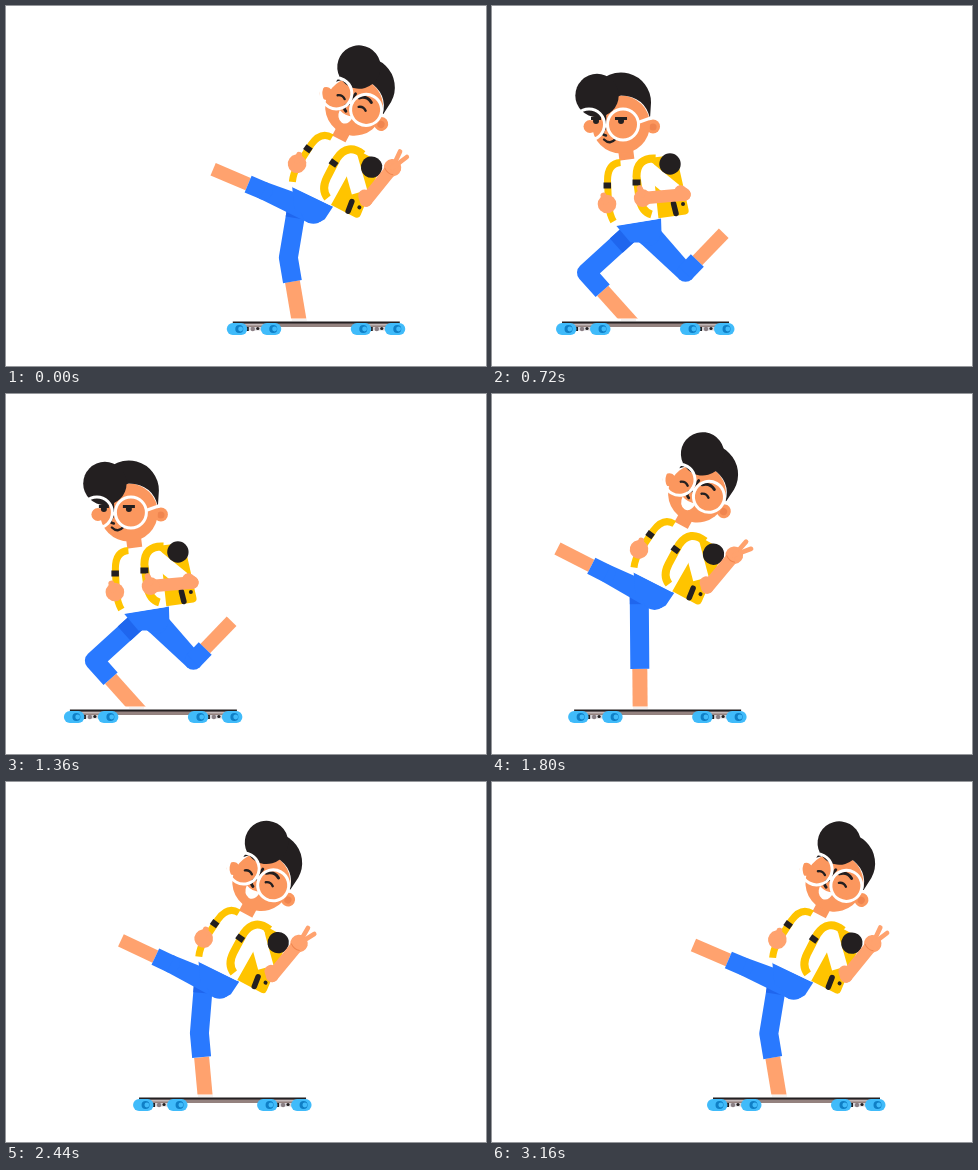
Animation of 480x360 px, one loop 3200 ms. Source, as an HTML page with a canvas:

```html
<!DOCTYPE html>
<html lang="en">
<head>
<meta charset="utf-8">
<title>Skateboarder</title>
<style>
html, body { margin: 0; width: 100%; height: 100%; overflow: hidden; background: #fff; }
canvas { display: block; width: 480px; height: 360px; }
</style>
</head>
<body>
<canvas id="stage"></canvas>
<script>
const LOOP = 3200, STEP = 40, TURN = 1140;
const canvas = document.getElementById('stage');
const ratio = window.devicePixelRatio || 1;
canvas.width = 480 * ratio;
canvas.height = 360 * ratio;
const c = canvas.getContext('2d');

const SKIN = '#ffa26e', FACE = '#fb975e', SHADE = '#f0854f', INK = '#231f20';
const YELLOW = '#ffc400', BLUE = '#2979ff', NAVY = '#1f66ee', WHITE = '#fff';
const WHEEL = '#40bbfa', HUB = '#0f7fc6';

const rad = a => a * Math.PI / 180;
const mix = (a, b, k) => a + (b - a) * k;
const polar = (p, len, deg) => [p[0] + len * Math.cos(rad(deg)), p[1] + len * Math.sin(rad(deg))];
const between = (p, q, k) => [mix(p[0], q[0], k), mix(p[1], q[1], k)];
function ease(t, from, to) {
  const u = Math.max(0, Math.min(1, (t - from) / (to - from)));
  return u * u * (3 - 2 * u);
}
// 1 while standing tall, 0 while crouched
const stance = (t, down, low, up, high) => 1 - ease(t, down, low) + ease(t, up, high);

// The board rolls back ever faster; a push then sends it gliding forward
function boardX(t) {
  const roll = s => 55 + 160 * (Math.max(0, s - TURN) / 2020) ** 1.81;
  const glide = 55 + 40 * (Math.max(0, TURN - t) / 740) ** 2.63;
  return t < TURN ? mix(roll(t + LOOP), glide, ease(t, 60, 340)) : roll(t);
}

function dot(x, y, r, color) {
  c.fillStyle = color;
  c.beginPath();
  c.arc(x, y, r, 0, 7);
  c.fill();
}
function fill(d, color) {
  c.fillStyle = color;
  c.fill(new Path2D(d));
}
function stroke(d, color, width, cap = 'butt') {
  c.strokeStyle = color;
  c.lineWidth = width;
  c.lineCap = cap;
  c.lineJoin = 'round';
  c.stroke(new Path2D(d));
}
const limb = (points, color, width, cap) => stroke('M' + points.join('L'), color, width, cap);
function taper(p, q, r1, r2, color) {
  const a = Math.atan2(q[1] - p[1], q[0] - p[0]) * 180 / Math.PI;
  const corners = [polar(p, r1, a - 90), polar(q, r2, a - 90), polar(q, r2, a + 90), polar(p, r1, a + 90)];
  fill('M' + corners.join('L') + 'Z', color);
  dot(...p, r1, color);
  dot(...q, r2, color);
}
function box(x, y, w, h, color) {
  c.fillStyle = color;
  c.fillRect(x, y, w, h);
}
function within(x, y, deg, draw) {
  c.save();
  c.translate(x, y);
  c.rotate(rad(deg));
  draw();
  c.restore();
}

function drawBoard() {
  for (const x of [0, 124]) {
    box(x + 14, 319, 24, 5.5, '#d8d6da');
    box(x + 19, 321, 3, 4, INK);
    dot(x + 26, 323, 2.2, '#8a7f84');
    dot(x + 31, 322.5, 1.6, INK);
  }
  fill('M6 317H173L169 321H10Z', '#94827f');
  for (const x of [10, 132]) box(x, 317.5, 38, 2, '#c2b8b8');
  box(6, 315.5, 167, 2, INK);
  for (const x of [0, 34, 124, 158]) {
    limb([[x + 6, 323], [x + 14.5, 323]], WHEEL, 12, 'round');
    dot(x + 12.5, 323, 4, HUB);
    dot(x + 13.8, 323, 2.4, WHEEL);
  }
}

function drawStandingLeg(hip) {
  const foot = [72, 313], up = 57.5, low = 62.2;
  const dx = foot[0] - hip[0], dy = foot[1] - hip[1];
  const dist = Math.min(Math.hypot(dx, dy), up + low);
  const along = (up * up - low * low + dist * dist) / (2 * dist);
  const out = Math.sqrt(Math.max(0, up * up - along * along));
  const knee = [hip[0] + (dx * along - dy * out) / dist, hip[1] + (dy * along + dx * out) / dist];
  const cuff = between(knee, foot, 0.39);
  c.save();
  c.beginPath();
  c.rect(-200, 0, 800, 312.5);
  c.clip();
  limb([cuff, between(knee, foot, 1.3)], SKIN, 15);
  c.restore();
  box(65, 313, 15, 2, '#f4f1f0');
  limb([hip, knee, cuff], BLUE, 19);
  limb([hip, between(hip, knee, 0.3)], NAVY, 19);
}

function drawRaisedLeg(hip, thigh, bend) {
  const knee = polar(hip, 54, thigh);
  const cuff = polar(knee, 17, thigh + bend);
  const foot = polar(knee, 55, thigh + bend);
  limb([cuff, foot], SKIN, 13.5);
  taper(hip, knee, 12, 9, BLUE);
  limb([knee, cuff], BLUE, 18);
}

function drawFace(k) {
  // Calm look while crouched, laughing while standing
  if (k > 0.5) {
    stroke('M-15 1Q-11 -2 -7 1M9 1Q13 -2 17 1', INK, 2.4, 'round');
    stroke('M5 -7Q11 -13 18 -9', INK, 3, 'round');
    stroke('M0 -9L-1 -3M-1 3Q-6 9 0 11', INK, 2.8, 'round');
    fill('M-6 13Q2 16 9 12Q9 23 2 23Q-5 22 -6 13Z', WHITE);
  } else {
    stroke('M-15 -6H-5M9 -6H21', INK, 3);
    dot(-10, -3.5, 3, INK);
    dot(15, -3.5, 3, INK);
    stroke('M-1 -9V0M-1 4Q-6 10 0 11', INK, 2.4, 'round');
    stroke('M-2 15Q4 21 10 14', INK, 2.4, 'round');
  }
}

function drawHead(k) {
  dot(-31, 2, 6.5, FACE);
  dot(32, 2, 7, FACE);
  dot(32, 2.5, 3.6, SHADE);
  dot(0, 0, 29, FACE);
  fill('M29 -6L30 -22A30 30 0 0 0 -26 -37L-28 -13Q-18 -25 0 -29Q24 -28 29 -6Z', INK);
  dot(mix(-24, -15, k), mix(-29, -37, k), 21.7, INK);
  const gx = mix(-15, -5, k), gy = mix(0, -3, k);
  within(gx, gy, 0, () => {
    drawFace(k);
    for (const x of [-17, 17]) {
      c.beginPath();
      c.arc(x, 0, 15.5, 0, 7);
      c.strokeStyle = WHITE;
      c.lineWidth = 3;
      c.stroke();
    }
    stroke(`M-2 2Q0 0 2 2M32 -2L${31 - gx} ${-7 - gy}`, WHITE, 3);
  });
}

function drawForearm(angle, wave) {
  const open = Math.max(0, Math.min(1, (angle - 190) / 70));
  limb([[42, -31], [46, -28]], SKIN, 12.5, 'round');
  within(46, -28, angle, () => {
    limb([[0, 0], [40, 0]], SKIN, 12.5, 'round');
    dot(42, 0, 8.8, SKIN);
    limb([[42, 4], [44, mix(10, 5, open)]], SKIN, 6, 'round');
    if (open > 0) {
      for (const a of [-14, 14]) limb([[42, 0], polar([42, 0], 18 * open, a + wave)], SKIN, 4.6, 'round');
      stroke('M37 -6Q34 0 37 5', SHADE, 1);
    }
  });
}

function drawTorso(k, arm, wave) {
  fill('M-22.5 3L22.5 -4L23 11Q20 20 12 20L-8 20Z', BLUE);
  // Backpack
  fill('M6 -64L32 -67Q37 -67 39 -62L50 -13Q51 -9 47 -8L18 -4Z', YELLOW);
  limb([[35, -19], [37.5, -9]], INK, 5.5, 'round');
  dot(44.5, -18.5, 2, INK);
  // Shirt
  limb([[-13, -74], [-11, -58]], FACE, 15);
  fill('M-18 -62Q-30 -57 -30 -45L-22.5 3.5L20 -3.5L15 -50Q14 -67 5 -65Z', WHITE);
  stroke('M-18 -60Q-31 -59 -31 -42L-30 -18Q-29 -8 -25 -1', YELLOW, 7);
  limb([[9, -53], [36, -31]], WHITE, 16);
  dot(9, -53, 8, WHITE);
  stroke('M17 -64Q-2 -65 -2 -46L1 -24Q3 -11 13 -8', YELLOW, 8);
  dot(31.5, -58.5, 10.7, INK);
  box(-35, -40, 7.5, 6, INK);
  box(-6, -43, 8, 6, INK);
  // Hand on the strap
  dot(-31.5, -18.5, 9.3, SKIN);
  limb([[-33, -21], [-35, -27]], SKIN, 6, 'round');
  drawForearm(arm, wave);
  within(-17.5, -98, -6 * k, () => drawHead(k));
}

function drawScene(t) {
  const k = stance(t, 70, 345, 1430, 1720);
  const settle = t > 1430 ? k * (LOOP - t) / 1400 : 0;
  const lean = 35 * k + settle;
  const px = mix(82.5, 85.5, k), py = mix(216.5, 191, k) - 2 * settle;
  const place = (x, y) => {
    const s = Math.sin(rad(lean)), o = Math.cos(rad(lean));
    return [px + x * o - y * s, py + x * s + y * o];
  };
  const thigh = mix(46, 203, stance(t, 50, 370, 1430, 1740)) + 4 * settle;
  const bend = -92 * (1 - stance(t, 150, 370, 1430, 1690));
  const arm = mix(175, 274, stance(t, 80, 350, 1490, 1790));

  c.setTransform(ratio, 0, 0, ratio, 0, 0);
  box(0, 0, 480, 360, WHITE);
  c.translate(boardX(t), 0);
  drawBoard();
  drawStandingLeg(place(-9.5, 11.5));
  drawRaisedLeg(place(9.5, 11.5), thigh, bend);
  within(px, py, lean, () => drawTorso(k, arm, 15 * settle * settle));
}

const start = performance.now();
function tick() {
  const t = (performance.now() - start) % LOOP;
  drawScene(Math.floor(t / STEP) * STEP);
  requestAnimationFrame(tick);
}
tick();
</script>
</body>
</html>
```
